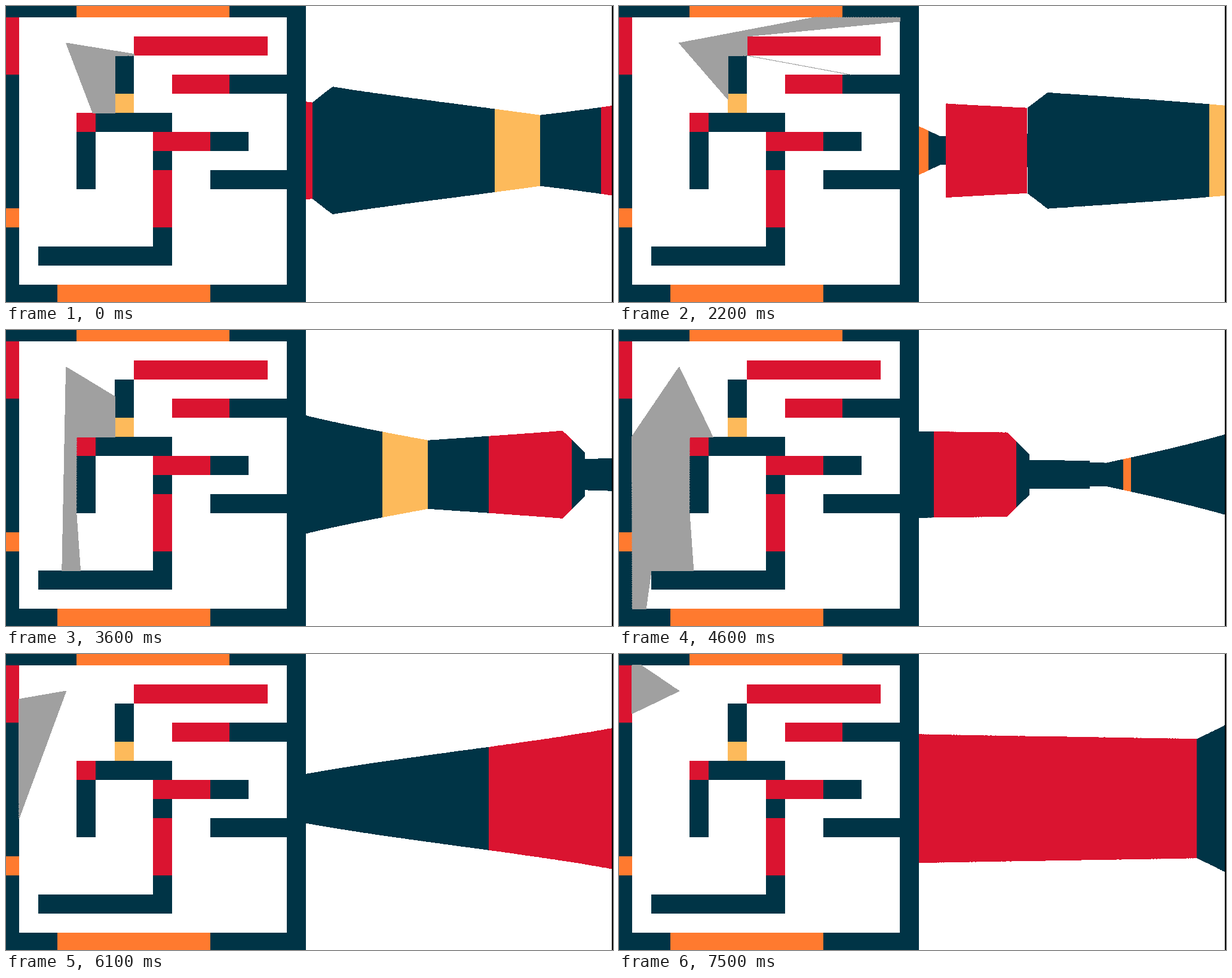
Write an HTML page with a canvas that moves like this. It is 1016 px wide and 496 px high and loops after 7700 ms.

```html
<!DOCTYPE html>
<html lang="en">
<head>
<meta charset="utf-8">
<title>Ray caster</title>
<style>
  html, body { margin: 0; width: 100%; height: 100%; overflow: hidden; background: #fff; }
  canvas { display: block; }
</style>
</head>
<body>
<canvas id="stage" width="1016" height="496"></canvas>
<script>
const MAP = [
  '0000222222220000',
  '1              0',
  '1      1111111 0',
  '1     0        0',
  '0     0  1110000',
  '0     3        0',
  '0   10000      0',
  '0   0   11100  0',
  '0   0   0      0',
  '0   0   1  00000',
  '0       1      0',
  '2       1      0',
  '0       0      0',
  '0 0000000      0',
  '0              0',
  '0002222222200000'
];
const COLORS = ['#003446', '#da1430', '#ff7a2f', '#fdba5b'];
const GRAY = 0xffa0a0a0;
const W = 1016, H = 496, CELL = 32, VIEW = 512;
const LEFT = 10, TOP = 13;            // part of the map cut off by the stage edge
const VIEW_X = 502, HORIZON = 242;
const PLAYER = { x: 3.456, y: 2.345 };
const FOV = Math.PI / 3, DEG = Math.PI / 180, STEP = 0.01;
const START = 1.523 - 87 * DEG;       // heading at 0 whole degrees
const TICK = 100, LOOP = 7700;

// [tick, heading in whole degrees]: a tap and a held left turn, then a tap and a held right turn
const TURNS = [
  [0, 39], [2, 39], [3, 38], [7, 38], [8, 36], [15, 15], [16, 16], [21, 16],
  [37, 64], [46, 94], [61, 140], [69, 166], [75, 184], [77, 184]
];

const ctx = document.getElementById('stage').getContext('2d', { willReadFrequently: true });

function rect(color, x, y, w, h) {
  ctx.fillStyle = color;
  ctx.fillRect(x, y, w, h);
}

function drawMap() {
  rect('#fff', 0, 0, W, H);
  MAP.forEach((row, y) => [...row].forEach((cell, x) => {
    if (cell !== ' ') rect(COLORS[cell], x * CELL - LEFT, y * CELL - TOP, CELL, CELL);
  }));
  rect('#000', VIEW_X + VIEW, 0, 2, H);
}

// Walks along one ray, marking its pixels, until it meets a wall
function castRay(angle, pixels) {
  const dx = Math.cos(angle), dy = Math.sin(angle);
  for (let t = 0; t < 20; t += STEP) {
    const x = PLAYER.x + t * dx, y = PLAYER.y + t * dy;
    pixels[(Math.floor(y * CELL) - TOP) * W + Math.floor(x * CELL) - LEFT] = GRAY;
    const cell = MAP[Math.floor(y)][Math.floor(x)];
    if (cell !== ' ') return { t, cell };
  }
}

function headingAt(tick) {
  const i = TURNS.findIndex(turn => turn[0] > tick);
  const [t0, a0] = TURNS[i - 1], [t1, a1] = TURNS[i];
  return START + DEG * Math.round(a0 + (a1 - a0) * (tick - t0) / (t1 - t0));
}

function draw(heading) {
  drawMap();
  const image = ctx.getImageData(0, 0, W, H);
  const pixels = new Uint32Array(image.data.buffer);
  const hits = Array.from({ length: VIEW }, (_, i) => {
    const offset = FOV * (i / VIEW - 0.5);
    const { t, cell } = castRay(heading + offset, pixels);
    return { cell, height: Math.floor(VIEW / (t * Math.cos(offset))) };
  });
  ctx.putImageData(image, 0, 0);
  hits.forEach(({ cell, height }, i) =>
    rect(COLORS[cell], VIEW_X + i, HORIZON - Math.floor(height / 2), 1, height));
}

let shown;
const begin = performance.now();
function update() {
  const tick = Math.floor((performance.now() - begin) % LOOP / TICK);
  const heading = headingAt(tick);
  if (heading !== shown) draw(shown = heading);
  requestAnimationFrame(update);
}
update();
</script>
</body>
</html>
```
